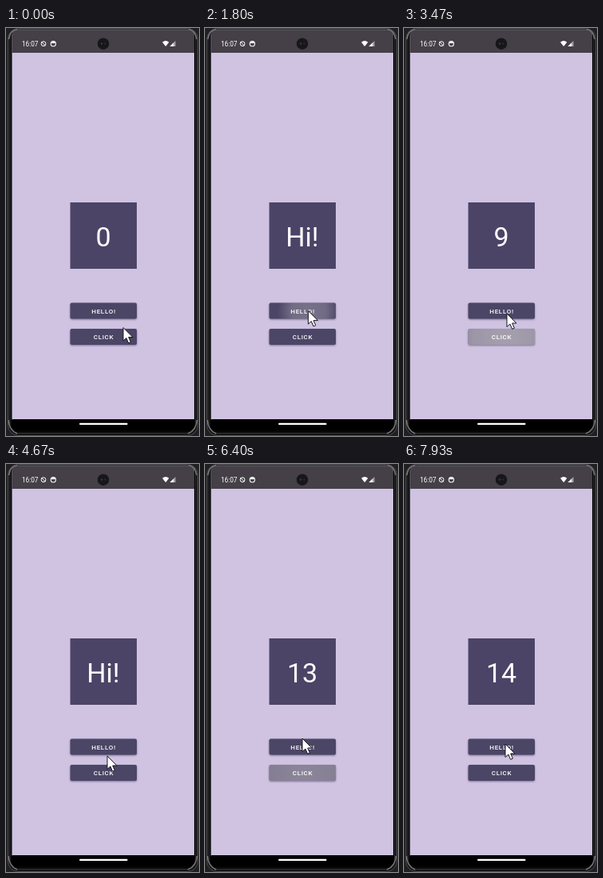
Recreate the animation shown at these times as an HTML page. Size 242x510 px, loop 8000 ms.

```html
<!DOCTYPE html>
<html lang="en">
<head>
<meta charset="utf-8">
<title>Counter app</title>
<style>
html, body { margin: 0; width: 100%; height: 100%; overflow: hidden; background: #202022; }
svg { display: block; width: 100vw; height: 100vh; }
text { font-family: Roboto, sans-serif; fill: #fff; }
.label { font-size: 8px; font-weight: 500; letter-spacing: .7px; }
</style>
</head>
<body>
<svg viewBox="0 0 242 510">
  <defs>
    <radialGradient id="glow">
      <stop offset="0" stop-color="#fff8f4"/>
      <stop offset=".55" stop-color="#fff8f4" stop-opacity=".85"/>
      <stop offset="1" stop-color="#fff8f4" stop-opacity="0"/>
    </radialGradient>
    <filter id="shadow" x="-10%" y="-30%" width="120%" height="180%">
      <feDropShadow dx="0" dy="1" stdDeviation="1" flood-color="#3a3050" flood-opacity=".55"/>
    </filter>
    <clipPath id="clipHello"><rect x="80.5" y="343.5" width="83.5" height="20" rx="2"/></clipPath>
    <clipPath id="clipClick"><rect x="80.5" y="376" width="83.5" height="20" rx="2"/></clipPath>
    <clipPath id="screen"><rect x="7.5" y="2.5" width="228.5" height="500.5" rx="7"/></clipPath>
  </defs>

  <!-- phone body -->
  <rect width="242" height="510" fill="#202022"/>
  <rect x="2.5" y=".5" width="238" height="509" rx="13" fill="#141415" stroke="#505052"/>
  <rect x="5" y="1.5" width="233" height="505" rx="10" fill="#08080a" stroke="#343437"/>
  <path d="M3 490Q4 503 14 507M239.500 490Q238.500 503 228 507M3.500 14Q5 3 14 1.500M239 14Q237.500 3 229 1.500" fill="none" stroke="#77777a" stroke-width="1.500"/>

  <g clip-path="url(#screen)">
    <rect x="7" y="2" width="230" height="488" fill="#d0c3e2"/>
    <rect x="7" y="2" width="230" height="29" fill="#453f48"/>
    <rect x="7" y="489" width="230" height="15" fill="#000"/>
  </g>
  <rect x="92" y="493.800" width="60.500" height="2.200" rx="1.100" fill="#fff"/>

  <!-- status bar -->
  <text x="20" y="22.700" font-size="8.200">16:07</text>
  <g fill="none" stroke="#fff">
    <circle cx="47" cy="19.700" r="2.900"/>
    <path d="M44.500 17.200L49.500 22.200"/>
    <circle cx="59.300" cy="19.700" r="3.100" stroke-width="1.100"/>
    <path d="M57 18.200H61.600" stroke-width="1.800"/>
  </g>
  <path d="M196 17.700Q200.200 14.200 204.400 17.700L200.200 23Z" fill="#fff"/>
  <path d="M205.500 23L212.500 16V23Z" fill="#aaa6ad"/>
  <path d="M205.500 23L210 18.500V23Z" fill="#fff"/>
  <circle cx="122" cy="19.700" r="7.200" fill="#17171a"/>
  <circle cx="120" cy="19.500" r="1.300" fill="#37373d"/>
  <circle cx="124.300" cy="19.500" r="1" fill="#303036"/>

  <!-- counter -->
  <rect x="80.500" y="218" width="83.500" height="83" fill="#4b4466"/>
  <text id="count" x="122" y="273" font-size="34" text-anchor="middle">0</text>

  <!-- buttons -->
  <g fill="#4b4466" filter="url(#shadow)">
    <rect x="80.500" y="343.500" width="83.500" height="20" rx="2"/>
    <rect x="80.500" y="376" width="83.500" height="20" rx="2"/>
  </g>
  <g id="hello" clip-path="url(#clipHello)"></g>
  <g id="click" clip-path="url(#clipClick)"></g>
  <text class="label" x="122.500" y="356.500" text-anchor="middle">HELLO!</text>
  <text class="label" x="122.500" y="388.800" text-anchor="middle">CLICK</text>

  <path id="cursor" d="M0 0V16.500L3.900 13L6.600 19.300L9.400 18.100L6.700 12H12Z" fill="#fff" stroke="#18141c" stroke-width="1" stroke-linejoin="round"/>
</svg>
<script>
const LOOP = 8000, FPS = 15;
const $ = id => document.getElementById(id);
const clamp = v => Math.min(1, Math.max(0, v));
const smooth = v => v * v * (3 - 2 * v);

// time, x, y of the pointer tip
const path = [
  [0, 147, 374.5], [330, 137, 385], [1200, 136, 385], [1600, 130, 353],
  [1950, 129, 354], [2400, 128, 387], [3260, 128, 387], [3470, 129, 357],
  [3900, 128, 352], [4400, 127, 353], [4670, 127, 365], [5050, 126, 383],
  [6120, 125, 386], [6400, 122, 343], [6700, 124, 350], [6900, 126, 357],
  [7120, 128, 382], [7350, 128, 381], [7750, 127, 350], [8000, 127, 350]
];

const clicks = [430, 630, 830, 1030, 2530, 2750, 2920, 3080, 3250, 5430, 5660, 5880, 6100, 7160];
const hellos = [1720, 3730, 6550];

function pointer(t) {
  const i = path.findIndex(p => p[0] > t);
  const [t0, x0, y0] = path[i - 1], [t1, x1, y1] = path[i];
  const k = smooth((t - t0) / (t1 - t0));
  return [x0 + (x1 - x0) * k, y0 + (y1 - y0) * k];
}

function makeRipple(at, group) {
  const el = document.createElementNS("http://www.w3.org/2000/svg", "circle");
  const [x, y] = pointer(at);
  el.setAttribute("cx", x);
  el.setAttribute("cy", y);
  el.setAttribute("fill", "url(#glow)");
  group.append(el);
  return { at, el };
}

const ripples = [
  ...clicks.map(at => makeRipple(at, $("click"))),
  ...hellos.map(at => makeRipple(at, $("hello")))
];

function label(t) {
  const done = clicks.filter(c => c <= t);
  const lastHello = hellos.filter(h => h <= t).pop() ?? -1;
  return lastHello > (done.at(-1) ?? -1) ? "Hi!" : String(done.length);
}

function draw(t) {
  const text = label(t);
  if ($("count").textContent !== text) $("count").textContent = text;
  for (const { at, el } of ripples) {
    const age = t - at;
    const grow = 1 - (1 - clamp(age / 450)) ** 2;
    const alpha = age < 0 ? 0 : .25 * clamp(age / 75) * (1 - clamp((age - 350) / 400));
    el.setAttribute("r", 10 + 90 * grow);
    el.setAttribute("opacity", alpha);
  }
  $("cursor").setAttribute("transform", `translate(${pointer(t)})`);
}

function tick(now) {
  const t = now % LOOP;
  draw(Math.floor(t * FPS / 1000 + .1) * 1000 / FPS % LOOP);
  requestAnimationFrame(tick);
}
requestAnimationFrame(tick);
</script>
</body>
</html>
```
